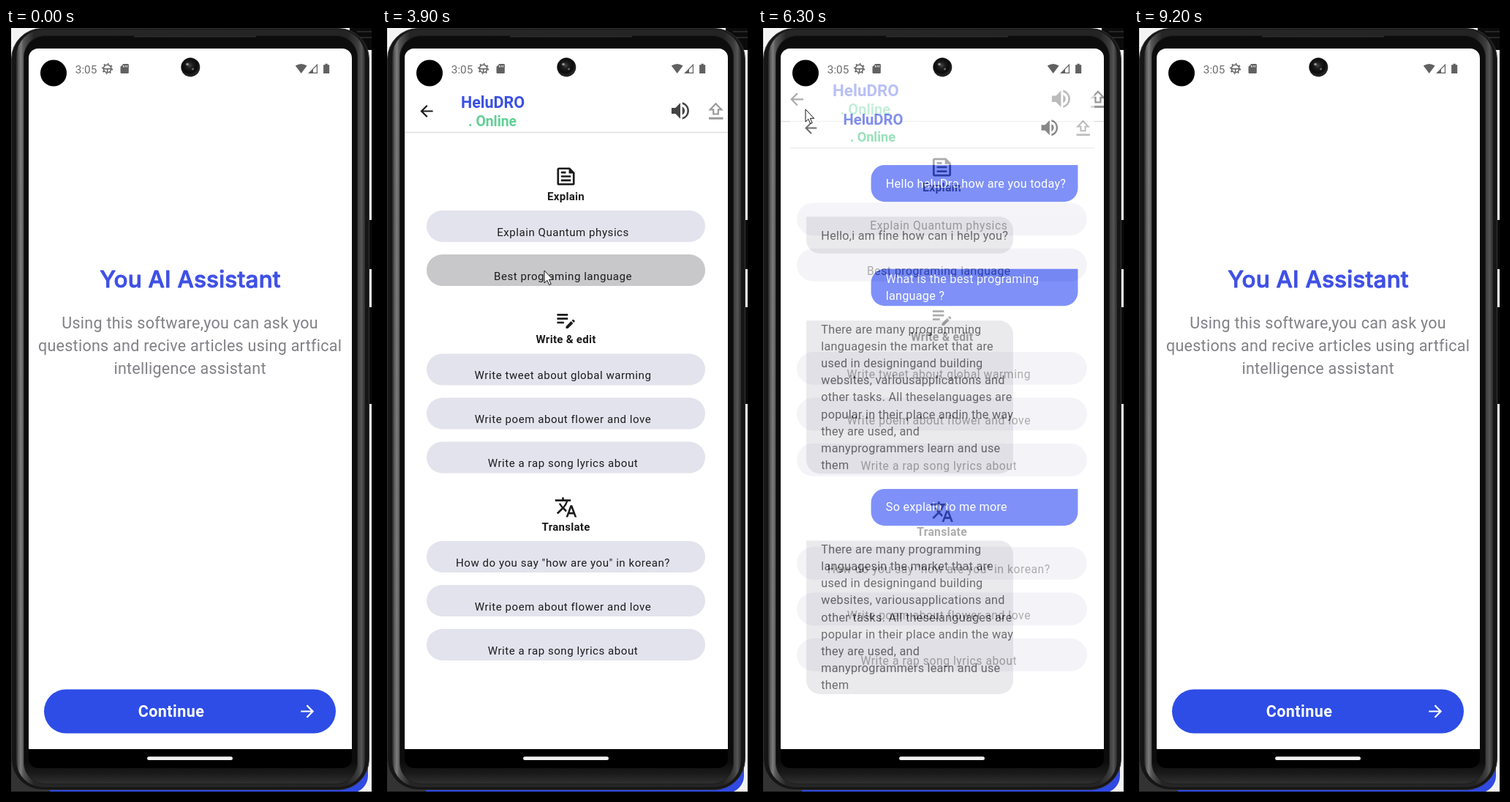
These frames come from a looping animation (506x1048 px, 9.3 s). An HTML page:

```html
<!DOCTYPE html>
<html lang="en">
<head>
<meta charset="utf-8">
<title>Assistant app walkthrough</title>
<style>
  html, body { margin: 0; width: 100%; height: 100%; overflow: hidden; background: #000; }
  svg { display: block; width: 506px; height: 1048px; font-family: Roboto, sans-serif; }
  .mid { text-anchor: middle; }
  .title { font: 500 31.5px Inter, sans-serif; letter-spacing: .2px; fill: #3f50e6; stroke: #3f50e6; stroke-width: .9; stroke-linejoin: round; }
  .lead { font-size: 21.5px; letter-spacing: .27px; fill: #808086; }
  .cta { font-size: 21.5px; font-weight: 700; letter-spacing: .45px; fill: #fff; }
  .name { font-size: 21.5px; font-weight: 700; fill: #3a50e2; }
  .online { font-size: 19.3px; font-weight: 700; fill: #5fd094; }
  .head { font-size: 15.05px; font-weight: 700; letter-spacing: .27px; fill: #1b1b1d; }
  .pill { font-size: 15.05px; letter-spacing: .54px; fill: #1b1b1d; }
  .chat { font-size: 17.2px; letter-spacing: .27px; }
  .page { transform-origin: 252px 506px; }
</style>
</head>
<body>
<svg viewBox="0 0 506 1048" xmlns="http://www.w3.org/2000/svg">
  <defs>
    <linearGradient id="rim" gradientUnits="userSpaceOnUse" x1="14" x2="491">
      <stop offset="0" stop-color="#262626"/><stop offset=".006" stop-color="#5a5a5a"/>
      <stop offset=".013" stop-color="#7c7c7c"/><stop offset=".021" stop-color="#555"/>
      <stop offset=".05" stop-color="#262626"/><stop offset=".95" stop-color="#242424"/>
      <stop offset=".979" stop-color="#3c3c3c"/><stop offset=".99" stop-color="#555"/>
      <stop offset="1" stop-color="#2c2c2c"/>
    </linearGradient>
    <linearGradient id="bezel" x2="0" y2="1">
      <stop offset="0" stop-color="#0c0c0c"/><stop offset=".97" stop-color="#0c0c0c"/>
      <stop offset=".985" stop-color="#191919"/><stop offset="1" stop-color="#303030"/>
    </linearGradient>
    <radialGradient id="lens" cx=".45" cy=".4">
      <stop offset="0" stop-color="#484848"/><stop offset=".35" stop-color="#1c1c1c"/>
      <stop offset=".8" stop-color="#0a0a0a"/><stop offset="1" stop-color="#222"/>
    </radialGradient>
    <radialGradient id="splash">
      <stop offset=".55" stop-color="#c0c0c0" stop-opacity=".56"/>
      <stop offset="1" stop-color="#c0c0c0" stop-opacity=".38"/>
    </radialGradient>
    <clipPath id="screen"><path d="M31 984V41a13 13 0 0 1 13-13H460a13 13 0 0 1 13 13V984z"/></clipPath>
    <clipPath id="ctaClip"><rect x="52" y="902.5" width="399" height="60" rx="30"/></clipPath>
    <clipPath id="pillClip"><rect x="61" y="309" width="381" height="43" rx="21.5"/></clipPath>
    <clipPath id="video"><rect x="7" width="493" height="1042"/></clipPath>
  </defs>

  <rect width="506" height="1048"/>
  <g clip-path="url(#video)">
    <rect x="7" width="493" height="1042" fill="#f4f4f4"/>
    <path d="M470 0h30v30h-30zM494 262h6v67h-6zM494 381h6v132h-6z" fill="#0b0b0b"/>
    <path d="M480 5h20M484 13h16" stroke="#444"/>
    <path d="M7 130h5v912H7z" fill="#1b1b1b"/>
    <path d="M7 133h5M7 912h5" stroke="#555" stroke-width="9"/>
    <path d="M7 1000h53v42H7z" fill="#333"/>
    <path d="M60 1000H495v20a24 24 0 0 1-14 22H60z" fill="#2f49e2"/>
    <rect x="7.5" y=".5" width="489" height="1039" rx="42" fill="#161616" stroke="#333"/>
    <rect x="14" y="2" width="477" height="1034" rx="37" fill="url(#rim)"/>
    <rect x="24.5" y="10.5" width="456" height="1021" rx="29" fill="url(#bezel)" stroke="#1d1d1d"/>
    <path d="M175 11.5H342" stroke="#2c2c2c" stroke-width="2"/>
    <rect x="31" y="28" width="442" height="982" rx="13"/>
  </g>

  <g clip-path="url(#screen)">
    <g id="p1" class="page"></g>
    <rect id="s2" x="31" y="28" width="442" height="956"/>
    <g id="p2" class="page"></g>
    <rect id="s3" x="31" y="28" width="442" height="956"/>
    <g id="p3" class="page"></g>
  </g>

  <rect x="193" y="994.3" width="117" height="4.8" rx="2.4" fill="#f2f2f2"/>
  <circle cx="65" cy="61.5" r="18"/>
  <circle cx="252.3" cy="53.6" r="13" fill="url(#lens)"/>
  <circle cx="248" cy="49.5" r="1.8" fill="#999"/>
  <circle cx="255.5" cy="56" r="1.6" fill="#666"/>
  <g fill="#616161">
    <text x="94.8" y="61.8" font-size="15.3" fill="#6c6c6c">3:05</text>
    <circle cx="138.6" cy="55.5" r="5.3" fill="none" stroke="#616161" stroke-width="1.6"/>
    <circle cx="138.6" cy="55.5" r="6.8" fill="none" stroke="#616161" stroke-width="1.6" stroke-dasharray="2 3.34"/>
    <path d="M133 55h11.2v1.5H133zM137.9 56h1.5v5h-1.5z"/>
    <path d="M160.5 49h6a1.3 1.3 0 0 1 1.3 1.3v10.4a1.3 1.3 0 0 1-1.3 1.3h-8.7a1.3 1.3 0 0 1-1.3-1.3V53z"/>
    <path d="M160.5 51v2.6M163 51v2.6M165.4 51v2.6" stroke="#fff"/>
    <path d="M395.8 51.6q7.9-5.4 15.8 0L403.7 62z"/>
    <path d="M425.4 50.3V61.3H414.6z" fill="none" stroke="#616161" stroke-width="1.2"/>
    <path d="M420 56v5.5h-6z"/>
    <path d="M436.5 48.8h3.3v1.4h2.4V62h-8.1V50.2h2.4z"/>
  </g>
  <path id="cursor" d="M0 0V17l3.9-3.7 2.8 6.2 2.5-1.1-2.8-6.1h5.3z" fill="#fff" stroke="#111" stroke-linejoin="round"/>
</svg>

<script>
const $ = id => document.getElementById(id);

const icons = {
  back: 'M20 11H7.83l5.59-5.59L12 4l-8 8 8 8 1.41-1.41L7.83 13H20z',
  next: 'M4 11h12.17l-5.59-5.59L12 4l8 8-8 8-1.41-1.41L16.17 13H4z',
  sound: 'M3 9v6h4l5 5V4L7 9zm13.5 3A4.5 4.5 0 0 0 14 7.97v8.05a4.47 4.47 0 0 0 2.5-4.02zM14 3.23v2.06a7 7 0 0 1 0 13.42v2.06a9 9 0 0 0 0-17.54z',
  article: 'M16 3H5a2 2 0 0 0-2 2v14a2 2 0 0 0 2 2h14a2 2 0 0 0 2-2V8zm3 16H5V5h10v4h4zM7 17h10v-2H7zm5-10H7v2h5zm-5 6h10v-2H7z',
  edit: 'M3 10h11v2H3zm0-2h11V6H3zm0 8h7v-2H3zm15-3.13.7-.71a1 1 0 0 1 1.4 0l.7.71a1 1 0 0 1 0 1.4l-.7.71zm-.7.71-5.3 5.3V21h2.1l5.3-5.3z',
  translate: 'M12.87 15.07l-2.54-2.51.03-.03A17.5 17.5 0 0 0 14.07 6H17V4h-7V2H8v2H1v2h11.17A15.6 15.6 0 0 1 9 11.35 14.5 14.5 0 0 1 6.69 8h-2a16.4 16.4 0 0 0 2.98 4.56l-5.09 5.02L4 19l5-5 3.11 3.11zM18.5 10h-2L12 22h2l1.12-3h4.75L21 22h2zm-2.62 7 1.62-4.33L19.12 17z'
};

const icon = (name, x, y, scale, fill) =>
  `<path transform="translate(${x} ${y}) scale(${scale}) translate(-12 -12)" fill="${fill}" fill-rule="evenodd" d="${icons[name]}"/>`;
const text = (cls, x, y, s, extra = '') => `<text class="${cls}" x="${x}" y="${y}" ${extra}>${s}</text>`;
const sheet = '<rect x="31" y="28" width="442" height="956" fill="#fff"/>';

const appBar = icon('back', 61, 113.5, 1.075, '#1b1b1d') +
  text('name', 108, 109, 'HeluDRO') + text('online', 118, 133.5, '. Online') +
  icon('sound', 408, 113, 1.34, '#444') +
  `<path d="M456.5 103.3l-7.7 8h4.4v6.2h6.6v-6.2h4.4z" fill="none" stroke="#999" stroke-width="2.2"/>
   <path d="M447 121.8h19.5v3H447z" fill="#999"/>
   <path d="M31 142.5H473" stroke="#dedede" stroke-width="1.4"/>`;

$('p1').innerHTML = sheet + text('title mid', 252, 353.5, 'You AI Assistant') +
  ['Using this software,you can ask you', 'questions and recive articles using artfical', 'intelligence assistant']
    .map((s, i) => text('lead mid', 251.6, 410 + 31 * i, s)).join('') +
  `<rect x="52" y="902.5" width="399" height="60" rx="30" fill="#2d4de6"/>
   <g clip-path="url(#ctaClip)"><circle id="ctaRipple" cx="253" cy="927" fill="url(#splash)"/></g>` +
  text('cta mid', 226, 940, 'Continue') + icon('next', 412.2, 932.5, 1.12, '#fff');

const sections = [
  ['article', 'Explain', 202.5, 234.5, 249, ['Explain Quantum physics', 'Best programing language']],
  ['edit', 'Write &amp; edit', 398, 430, 444.5, ['Write tweet about global warming', 'Write poem about flower and love', 'Write a rap song lyrics about']],
  ['translate', 'Translate', 654, 686, 700, ['How do you say "how are you" in korean?', 'Write poem about flower and love', 'Write a rap song lyrics about']]
];
const pill = (s, y) => `<rect x="61" y="${y}" width="381" height="43" rx="21.5" fill="#e3e3ed"/>` +
  (y === 309 ? '<g clip-path="url(#pillClip)"><circle id="pillRipple" cx="222" cy="331" fill="#bbb" fill-opacity=".65"/></g>' : '') +
  text('pill mid', 247.5, y + 34.7, s);
$('p2').innerHTML = sheet + appBar + sections.map(([ic, label, iy, ly, y, rows]) =>
  icon(ic, 251.5, iy, 1.34, '#1b1b1d') + text('head mid', 251.6, ly, label) +
  rows.map((s, i) => pill(s, y + 60 * i)).join('')).join('');

// Bubbles have one square top corner: right for the user, left for the bot.
function bubble(mine, y, h, base, lines) {
  const x = mine ? 148.5 : 54.5, r = 20, w = 300.5;
  const top = mine ? `M${x} ${y + r}a${r} ${r} 0 0 1 ${r}-${r}h${w - r}v${h - r}`
                   : `M${x} ${y}h${w - r}a${r} ${r} 0 0 1 ${r} ${r}v${h - 2 * r}`;
  return `<path d="${top}a${r} ${r} 0 0 1-${r} ${r}h-${w - 2 * r}a${r} ${r} 0 0 1-${r}-${r}z" fill="${mine ? '#3854f5' : '#dfdfe3'}"/>` +
    lines.map((s, i) => text('chat', mine ? 170 : 76, base + 24.65 * i, s, `fill="${mine ? '#fff' : '#1b1b1d'}"`)).join('');
}
const answer = ['There are many programming', 'languagesin the market that are', 'used in designingand building',
  'websites, variousapplications and', 'other tasks. All theselanguages are', 'popular in their place andin the way',
  'they are used, and', 'manyprogrammers learn and use', 'them'];
$('p3').innerHTML = sheet + appBar +
  bubble(true, 167, 53.5, 200, ['Hello heluDro,how are you today?']) +
  bubble(false, 242, 53.5, 275, ['Hello,i am fine how can i help you?']) +
  bubble(true, 317.8, 53.5, 338, ['What is the best programing', 'language ?']) +
  bubble(false, 392.6, 222, 411, answer) +
  bubble(true, 636.6, 53.5, 669, ['So explain to me more']) +
  bubble(false, 711.6, 222.5, 730, answer);

const LOOP = 9300, STEP = 100, ZOOM = 300;
const clamp = v => Math.min(1, Math.max(0, v));
const ramp = (t, a, b) => clamp((t - a) / (b - a));
const smooth = p => p * p * (3 - 2 * p);
// Late start, quick rise, long settle.
const zoomEase = p => p < 1 / 6 ? .4 * (6 * p) ** 4 : 1 - .6 * (1 - (p - 1 / 6) * 1.2) ** 5;

// [time, x, y] of the pointer tip
const pointer = [[900, 300, 1046], [1500, 253, 926], [2700, 253, 926], [3500, 222, 331],
  [4400, 222, 331], [5300, 65, 111], [8200, 65, 111], [8800, 502, 172]];

function pointerAt(t) {
  const i = pointer.findIndex(k => k[0] > t);
  if (i < 1) return null;
  const [t0, x0, y0] = pointer[i - 1], [t1, x1, y1] = pointer[i];
  const e = smooth(ramp(t, t0, t1));
  return [x0 + (x1 - x0) * e, y0 + (y1 - y0) * e];
}

function layer(t, push, pop) {
  const p = ramp(t, push, push + ZOOM), q = ramp(t, pop, pop + ZOOM);
  if (q > 0) {
    const e = zoomEase(q);
    return { opacity: 1 - ramp(q, .1, .45), scale: 1 - .1 * e, under: 1.1 - .1 * e, scrim: 0 };
  }
  const e = zoomEase(p);
  return { opacity: ramp(p, .125, .25), scale: .85 + .15 * e, under: 1 + .05 * e, scrim: .6 * ramp(p, .2075, .4175) };
}

function ripple(id, t, from, to, end, radius) {
  $(id).setAttribute('r', t >= from && t < end ? 20 + radius * ramp(t, from, to) : 0);
}

function draw(t) {
  const a = layer(t, 2132, 7432), b = layer(t, 3932, 6232);
  $('p1').style.transform = `scale(${a.under})`;
  $('p2').style.transform = `scale(${a.scale * b.under})`;
  $('p3').style.transform = `scale(${b.scale})`;
  $('p2').style.opacity = a.opacity;
  $('p3').style.opacity = b.opacity;
  $('s2').style.opacity = a.scrim;
  $('s3').style.opacity = b.scrim;
  ripple('ctaRipple', t, 1800, 2100, 2600, 200);
  ripple('pillRipple', t, 3700, 3900, 4400, 220);
  const at = pointerAt(t);
  $('cursor').setAttribute('visibility', at ? 'visible' : 'hidden');
  if (at) $('cursor').setAttribute('transform', `translate(${at})`);
}

const start = performance.now();
function tick() {
  const t = (performance.now() - start) % LOOP;
  draw(Math.floor(t / STEP) * STEP);
  requestAnimationFrame(tick);
}
tick();
</script>
</body>
</html>
```
